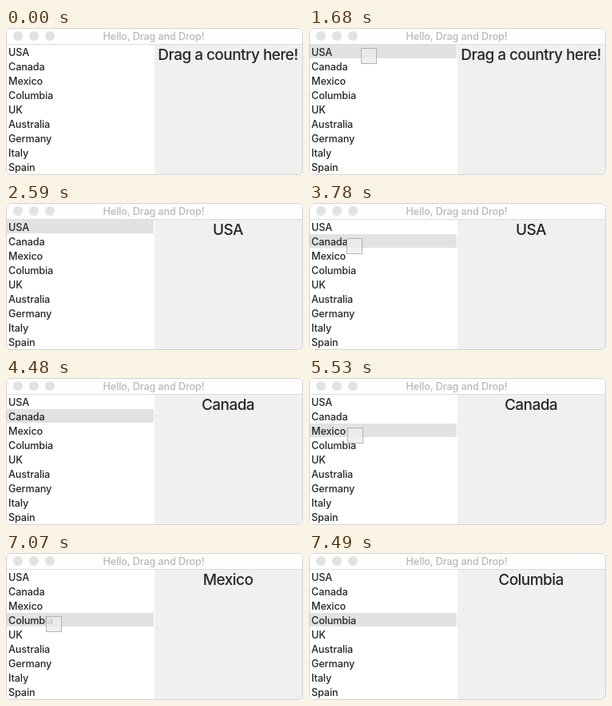
Write an HTML page with a canvas that moves like this. It is 372 by 184 pixels and loops after 8000 ms.

```html
<!DOCTYPE html>
<html lang="en">
<head>
<meta charset="utf-8">
<title>Hello, Drag and Drop!</title>
<style>
  html, body { margin: 0; width: 100%; height: 100%; overflow: hidden; background: #fff; }
  canvas { display: block; width: 372px; height: 184px; }
</style>
</head>
<body>
<canvas id="stage"></canvas>
<script>
const W = 372, H = 184, LOOP = 8000, STEP = 70;
const FONT = 'Inter, "Liberation Sans", sans-serif';
const SMALL = { size: 12.6, tracking: -0.1 };
const LARGE = { size: 19, tracking: -0.55 };
const ROW_TOP = 21, ROW_H = 18, SPLIT = 186;
const countries = ['USA', 'Canada', 'Mexico', 'Columbia', 'UK',
                   'Australia', 'Germany', 'Italy', 'Spain'];

// Each drag picks a row at `start`, rests at `end` and lands at `drop`.
const drags = [
  { row: 0, start: 1680, end: 2450, drop: 2590, from: [65, 25], to: [262, 88] },
  { row: 1, start: 3780, end: 4340, drop: 4480, from: [47, 44], to: [258, 106] },
  { row: 2, start: 5530, end: 5950, drop: 6020, from: [48, 62], to: [258, 93] },
  { row: 3, start: 7070, end: 7420, drop: 7490, from: [50, 79], to: [258, 83] }
];

const canvas = document.getElementById('stage');
const ctx = canvas.getContext('2d');
const scale = window.devicePixelRatio || 1;
canvas.width = W * scale;
canvas.height = H * scale;

function rect(x, y, w, h, color) {
  ctx.fillStyle = color;
  ctx.fillRect(x, y, w, h);
}

function text(str, x, y, style, color, align = 'left') {
  ctx.font = `500 ${style.size}px ${FONT}`;
  ctx.letterSpacing = `${style.tracking}px`;
  ctx.textAlign = align;
  ctx.fillStyle = color;
  ctx.fillText(str, x, y);
}

function drawWindow() {
  rect(0, 0, W, H, '#fff');
  rect(1, 1, W - 2, 19, '#fefefe');
  rect(1, 20, W - 2, 1, '#dcdcdc');
  for (const x of [15, 35, 55]) {
    ctx.beginPath();
    ctx.arc(x, 10, 6, 0, 2 * Math.PI);
    ctx.fillStyle = '#e2e2e2';
    ctx.fill();
  }
  text('Hello, Drag and Drop!', 185, 15, SMALL, '#b8b8b8', 'center');
  rect(SPLIT, ROW_TOP, W - 1 - SPLIT, H - 1 - ROW_TOP, '#f0f0f0');
}

function drawList(selected) {
  if (selected >= 0) rect(1, ROW_TOP + selected * ROW_H, 184, 17, '#e2e2e2');
  countries.forEach((name, i) => text(name, 3, 35 + i * ROW_H, SMALL, '#262626'));
}

function drawFrame() {
  ctx.beginPath();
  ctx.roundRect(0.5, 0.5, W - 1, H - 1, 5);
  ctx.strokeStyle = '#d2d2d2';
  ctx.lineWidth = 1;
  ctx.stroke();
}

function drawGhost(drag, time) {
  const tick = Math.floor((time - drag.start) / STEP) * STEP;
  const u = Math.min(1, tick / (drag.end - drag.start));
  const p = (u + u * u * (3 - 2 * u)) / 2;
  const [x, y] = drag.from.map((a, i) => Math.round(a + (drag.to[i] - a) * p));
  rect(x, y, 20, 20, 'rgba(237,237,237,0.8)');
  ctx.strokeStyle = 'rgba(150,150,150,0.65)';
  ctx.lineWidth = 1;
  ctx.strokeRect(x + 0.5, y + 0.5, 19, 19);
}

function draw(time) {
  const current = drags.filter(d => time >= d.start).pop();
  const dropped = drags.filter(d => time >= d.drop).pop();
  const label = dropped ? countries[dropped.row] : 'Drag a country here!';

  ctx.setTransform(scale, 0, 0, scale, 0, 0);
  drawWindow();
  drawList(current ? current.row : -1);
  text(label, 278, 40, LARGE, '#262626', 'center');
  if (current && time < current.drop) drawGhost(current, time);
  drawFrame();
}

const origin = performance.now();
function loop() {
  draw((performance.now() - origin) % LOOP);
  requestAnimationFrame(loop);
}
loop();
</script>
</body>
</html>
```
